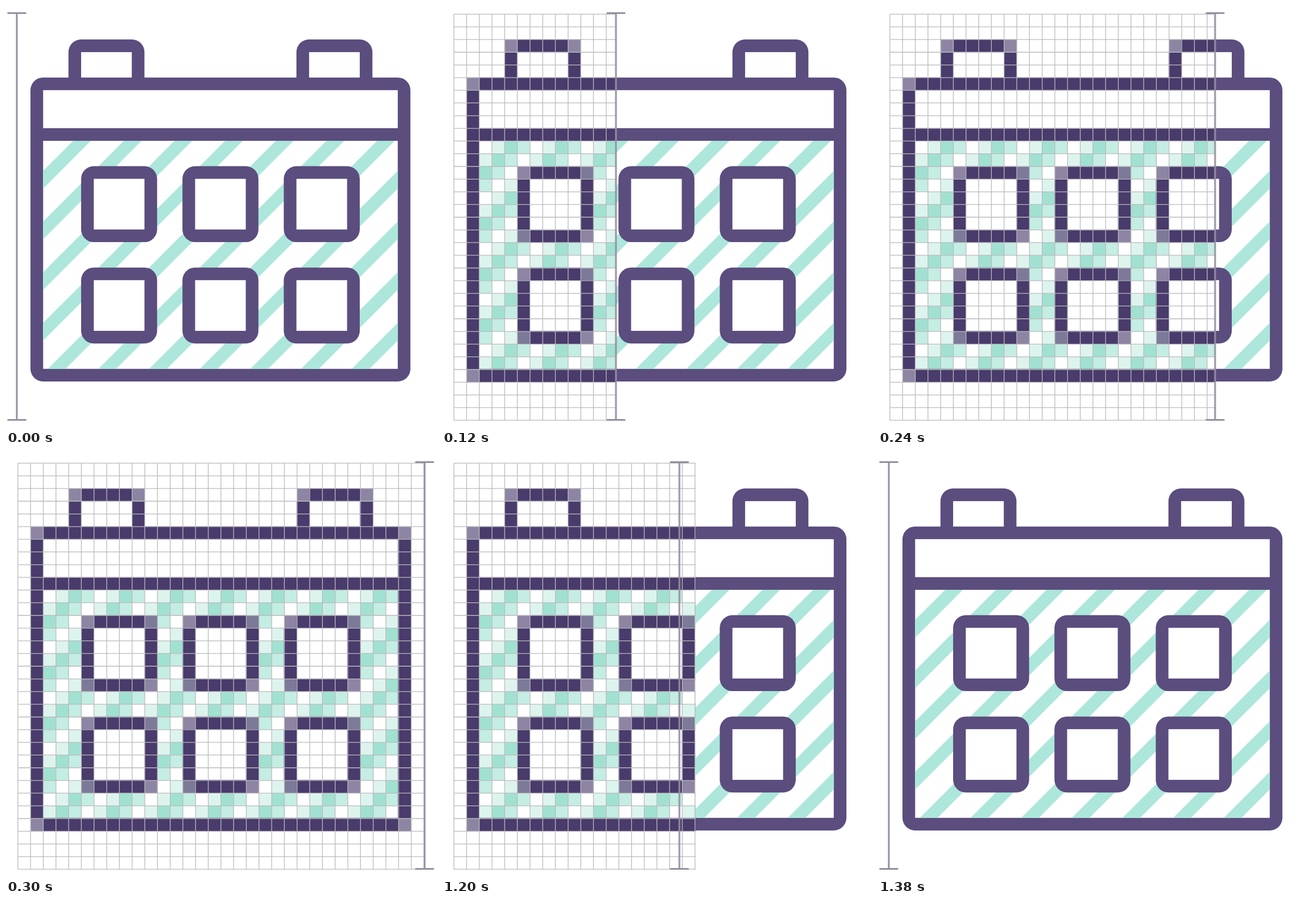
Animation of 756x740 px, one loop 2.25 s. Source, as an HTML page:

```html
<!DOCTYPE html>
<html lang="en">
<head>
<meta charset="utf-8">
<title>Calendar icon wipe</title>
<style>
  html, body { margin: 0; width: 100%; height: 100%; overflow: hidden; background: #fff; }
  body { position: relative; }
  svg { position: absolute; left: 0; top: 0; width: 756px; height: 740px; overflow: hidden; }
  /* The tiny negative delay keeps each step safely on its side of the boundary. */
  #pixels { animation: wipe 2250ms -3ms infinite; }
  #bar { animation: slide 2250ms -3ms infinite; }

  @keyframes wipe {
    0% { clip-path: inset(0 737px 0 0); animation-timing-function: steps(10, end); }
    13.3333% { clip-path: inset(0 20px 0 0); animation-timing-function: step-end; }
    48% { clip-path: inset(0 18px 0 0); animation-timing-function: steps(10, end); }
    61.3333%, 100% { clip-path: inset(0 748px 0 0); animation-timing-function: step-end; }
  }
  @keyframes slide {
    0% { transform: translateX(0); animation-timing-function: steps(10, end); }
    13.3333% { transform: translateX(717px); animation-timing-function: step-end; }
    48% { transform: translateX(717px); animation-timing-function: steps(9, end); }
    60%, 100% { transform: translateX(0); animation-timing-function: step-end; }
  }
</style>
</head>
<body>
<svg id="smooth" viewBox="0 0 756 740">
  <clipPath id="page"><rect x="65" y="236" width="624" height="402"/></clipPath>
</svg>
<svg id="pixels" viewBox="0 0 756 740"></svg>
<svg viewBox="0 0 756 740">
  <path id="bar" d="M19 12.5V727.5M2.5 12.5h33M2.5 727.5h33" fill="none" stroke="#9490a1" stroke-width="3"/>
</svg>
<script>
  const smooth = document.getElementById('smooth');
  const pixels = document.getElementById('pixels');
  const tabCols = [4, 22];
  const dayCols = [5, 13, 21];
  const dayRows = [12, 20];

  function add(parent, name, attrs) {
    const node = document.createElementNS('http://www.w3.org/2000/svg', name);
    for (const key in attrs) node.setAttribute(key, attrs[key]);
    parent.append(node);
  }

  function box(parent, x, y, width, height, fill, rx = 0) {
    add(parent, 'rect', { x, y, width, height, fill, rx });
  }

  // Smooth icon
  const unit = 22.267, iconX = 20.75, iconY = 14.3;
  const purple = '#5b4d7e';

  function block(col, row, cols, rows, fill, rx) {
    box(smooth, iconX + col * unit, iconY + row * unit, cols * unit, rows * unit, fill, rx);
  }

  function frame(col, row, cols, rows) {
    block(col, row, cols, rows, purple, unit);
    block(col + 1, row + 1, cols - 2, rows - 2, '#fff');
  }

  for (const col of tabCols) frame(col, 2, 6, 6);
  frame(1, 5, 30, 24);

  let stripes = '';
  for (let k = 0; k < 11; k++) {
    const sum = 370.6 + k * 4 * unit;
    stripes += `M${sum - 200} 200L${sum - 680} 680`;
  }
  add(smooth, 'path', {
    d: stripes, stroke: '#ade7db', 'stroke-width': 22, 'clip-path': 'url(#page)'
  });
  block(1.5, 9, 29, 1, purple);
  for (const row of dayRows) for (const col of dayCols) frame(col, row, 6, 6);

  // Pixel icon
  const size = 22.31, gridX = 20.9, gridY = 14.3, count = 32;
  const dark = '#493b6b', soft = '#8d85a3', slate = '#7c7a98';
  const greens = ['#fff', '#ddf4ee', '#a1e1d1', '#c4ede3'];
  const cells = new Map();
  const paint = (col, row, fill) => cells.set(col + row * count, fill);

  function outline(col, row, cols, rows, corners) {
    const right = col + cols - 1, bottom = row + rows - 1;
    for (let c = col; c <= right; c++) {
      for (let r = row; r <= bottom; r++) {
        const edgeX = c === col || c === right;
        const edgeY = r === row || r === bottom;
        if (edgeX && edgeY) paint(c, r, corners[(r === bottom) * 2 + (c === right)]);
        else paint(c, r, edgeX || edgeY ? dark : '#fff');
      }
    }
  }

  for (const col of tabCols) outline(col, 2, 6, 5, [soft, soft, dark, dark]);
  outline(1, 5, 30, 24, [soft, soft, soft, soft]);
  for (let c = 1; c <= 30; c++) paint(c, 9, dark);
  for (let r = 10; r < 28; r++) {
    for (let c = 2; c < 30; c++) paint(c, r, greens[(c + r) % 4]);
  }
  for (const row of dayRows) {
    for (const col of dayCols) outline(col, row, 6, 6, [soft, slate, slate, soft]);
  }

  // Dark cells go on top and start at the smooth icon's slightly tighter pitch.
  function drawCells(isDark) {
    const pitch = isDark ? unit : size;
    for (const [index, fill] of cells) {
      if ((fill === dark) !== isDark) continue;
      const col = index % count, row = Math.floor(index / count);
      const x = gridX + col * pitch, y = gridY + row * pitch;
      box(pixels, x, y, gridX + (col + 1) * size - x, gridY + (row + 1) * size - y, fill);
    }
  }

  const span = size * count;
  box(pixels, gridX, gridY, span, span, '#fff');
  drawCells(false);
  drawCells(true);

  let lines = '';
  for (let i = 0; i <= count; i++) {
    lines += `M${gridX + i * size} ${gridY}v${span}M${gridX} ${gridY + i * size}h${span}`;
  }
  add(pixels, 'path', { d: lines, stroke: '#bbbabf', 'stroke-width': 1.3 });
</script>
</body>
</html>
```
